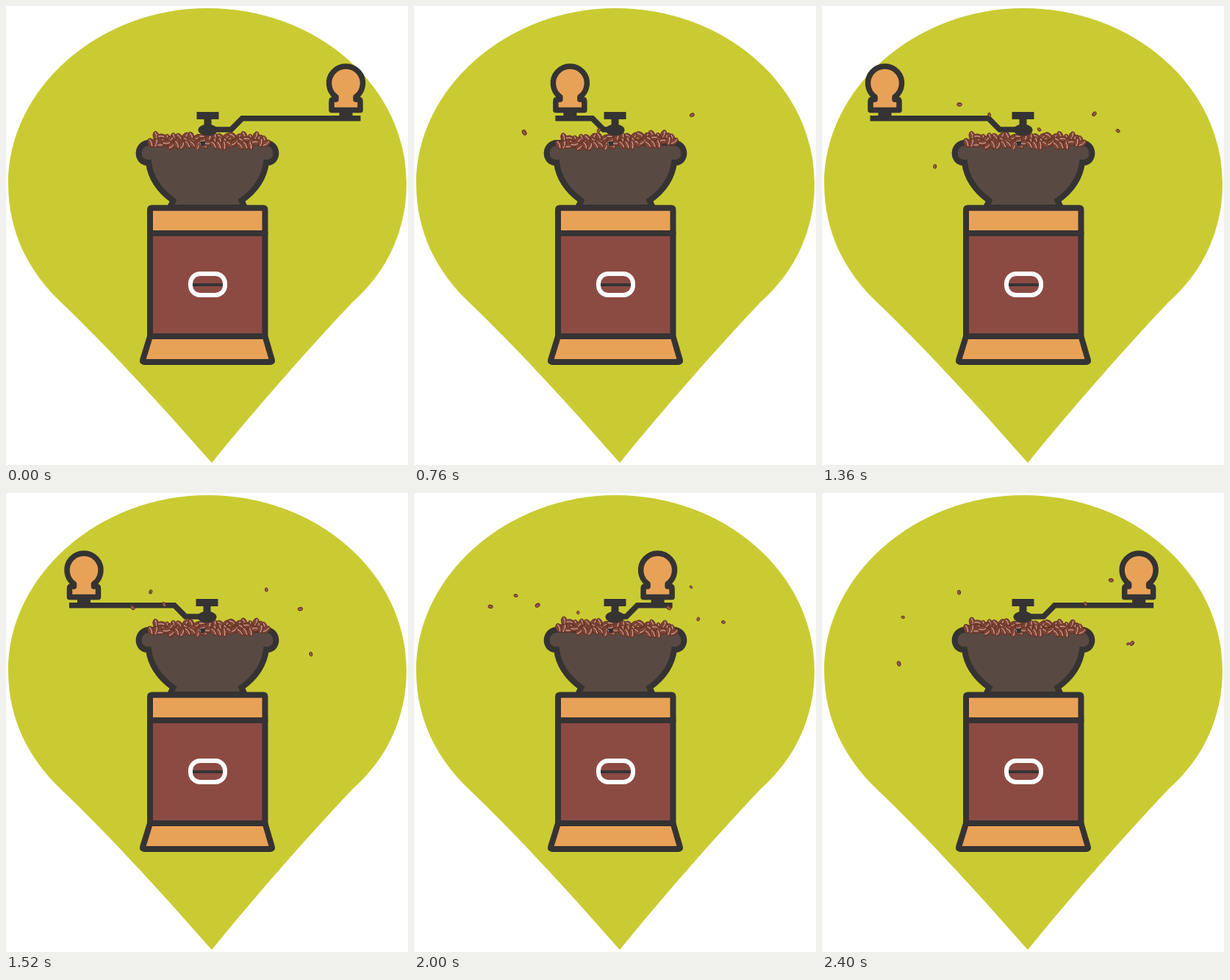
An HTML page with a canvas for the animation above (2.48 s loop, 547 by 624 pixels).

```html
<!DOCTYPE html>
<html lang="en">
<head>
<meta charset="utf-8">
<title>Coffee grinder</title>
<style>
html, body { margin: 0; width: 100%; height: 100%; overflow: hidden; background: #fff; }
canvas { display: block; }
</style>
</head>
<body>
<canvas id="stage" width="547" height="624"></canvas>
<script>
const ctx = document.getElementById('stage').getContext('2d');
const LOOP = 2480, TICK = 40;
const DARK = '#353333', ORANGE = '#e8a257', BROWN = '#8b4b43', SOIL = '#584a42', LIME = '#cacb33';

// Crank angle in degrees at a few times
const turn = [[0, 0], [400, 61], [760, 109], [1360, 180], [2000, 288], [2400, 327], [LOOP, 360]];

const pin = new Path2D('M274 3C424 3 545 110 545 241C545 303 520 360 472 402C408 470 346 540 280 621C200 530 130 455 75 403C33 363 3 310 3 241C3 113 126 3 274 3Z');
const bowl = new Path2D('M195 186H353C372 186 372 214 354 213C351 236 338 252 320.5 264.5L325 274H223L227.5 264.5C210 252 197 236 194 213C176 214 176 186 195 186Z');
const lid = new Path2D('M198.5 274.5H350Q352.5 274.5 352.5 277V309H196V277Q196 274.5 198.5 274.5Z');
const box = new Path2D('M196 309H352.5V449H196Z');
const foot = new Path2D('M196 449H352.5L362 481.5Q362.5 484 360 484H188Q185.5 484 186 481.5Z');
const knob = new Path2D('M-13.5 123.5A23 23 0 1 1 13.5 123.5V127H17.5Q19.5 127 19.5 130V141.5H-19.5V130Q-19.5 127 -17.5 127H-13.5Z');

let seed = 11;
function random(min, max) {
  seed = (seed * 16807) % 2147483647;
  return min + (max - min) * seed / 2147483647;
}

// Beans lying in the bowl: back row first
const heap = [];
for (let row = 0; row < 3; row++) {
  const count = 19 + row * 2, left = 204 - row * 3.5, right = 348 + row * 3;
  for (let i = 0; i < count; i++) {
    heap.push({
      x: left + (right - left) * i / (count - 1),
      y: 179 + row * 4.5 + random(-2.5, 2),
      angle: random(0, Math.PI)
    });
  }
}

// Thrown beans leave more and more often, to alternate sides
const COUNT = 18, LIFE = 780;
const flights = Array.from({ length: COUNT }, (_, i) => ({
  start: 160 + 2040 * (i / COUNT) ** .6,
  reach: (i % 2 ? 1 : -1) * random(110, 215),
  lift: random(.24, .36),
  size: random(.55, 1),
  spin: random(0, Math.PI)
}));

function shape(path, fill, width, join = 'round') {
  ctx.fillStyle = fill;
  ctx.fill(path);
  if (!width) return;
  ctx.lineJoin = join;
  ctx.lineWidth = width;
  ctx.strokeStyle = DARK;
  ctx.stroke(path);
}

function rect(x, y, w, h) {
  ctx.fillStyle = DARK;
  ctx.fillRect(x, y, w, h);
}

function bean(x, y, rx, ry, angle, crease) {
  ctx.save();
  ctx.translate(x, y);
  ctx.rotate(angle);
  ctx.beginPath();
  ctx.ellipse(0, 0, rx, ry, 0, 0, 7);
  ctx.fillStyle = '#814436';
  ctx.fill();
  ctx.lineWidth = .9;
  ctx.strokeStyle = '#5f3026';
  ctx.stroke();
  ctx.beginPath();
  ctx.moveTo(-rx * .8, 0);
  ctx.quadraticCurveTo(0, -ry * .5, rx * .8, 0);
  ctx.lineWidth = .8;
  ctx.strokeStyle = crease;
  ctx.stroke();
  ctx.restore();
}

function lerpKeys(keys, t) {
  const i = keys.findIndex(([end]) => t < end);
  const [t0, a] = keys[i - 1], [t1, b] = keys[i];
  return a + (b - a) * (t - t0) / (t1 - t0);
}

function drawFlight({ start, reach, lift, size, spin }, t) {
  const age = t - start;
  if (age <= 0 || age > LIFE) return;
  const x = 274 + reach * (1 - Math.exp(-age / 300));
  const y = 182 - lift * age + .0005 * age * age;
  bean(x, y, 3.7 * size, 2.6 * size, spin + age / 230, '#b58a70');
}

function drawCrank(pivot, reach) {
  const side = Math.max(-1, Math.min(1, reach / 30));
  const elbow = pivot + side * (23 + .127 * Math.abs(reach));
  const x = pivot + reach;
  ctx.lineWidth = 7.5;
  ctx.lineJoin = 'miter';
  ctx.strokeStyle = DARK;
  ctx.beginPath();
  ctx.moveTo(pivot, 168);
  ctx.lineTo(elbow - 15 * side, 168);
  ctx.lineTo(elbow, 152.8);
  ctx.lineTo(x + 20 * side, 152.8);
  ctx.stroke();
  rect(x - 9, 143, 18, 9);
  ctx.save();
  ctx.translate(x, 0);
  shape(knob, ORANGE, 7.5);
  ctx.restore();
}

function drawHub(x) {
  rect(x - 15, 144, 30, 10);
  rect(x - 5, 150, 10, 16);
  ctx.beginPath();
  ctx.ellipse(x, 168.5, 13, 7.8, 0, 0, 7);
  ctx.fill();
}

function drawBody() {
  shape(foot, ORANGE, 8);
  shape(box, BROWN, 8);
  shape(lid, ORANGE, 8);
  ctx.beginPath();
  ctx.roundRect(251, 364, 47, 29, 13);
  ctx.lineWidth = 6;
  ctx.strokeStyle = '#fff';
  ctx.stroke();
  rect(254, 377, 41, 4);
}

function drawHeap(tilt) {
  ctx.save();
  ctx.translate(274, 186);
  ctx.rotate(tilt);
  ctx.translate(-274, -186);
  heap.forEach(b => bean(b.x, b.y, 6.2, 3.9, b.angle, '#e6cfc0'));
  ctx.restore();
  rect(265, 184, 6, 6);
}

function draw(time) {
  const t = Math.floor(time / TICK) * TICK;
  const reach = 188 * Math.cos(lerpKeys(turn, t) * Math.PI / 180);
  const pivot = 274.5 - Math.min(t / 800, 1);

  ctx.fillStyle = '#fff';
  ctx.fillRect(0, 0, 547, 624);
  shape(pin, LIME);
  shape(bowl, SOIL, 8, 'miter');
  drawBody();
  drawCrank(pivot, reach);
  flights.forEach(f => drawFlight(f, t));
  drawHeap(.04 * Math.sin(Math.PI * reach / 188));
  drawHub(pivot);
}

let origin = null;
function tick(now) {
  if (origin === null) origin = now;
  draw((now - origin) % LOOP);
  requestAnimationFrame(tick);
}
draw(0);
requestAnimationFrame(tick);
</script>
</body>
</html>
```
